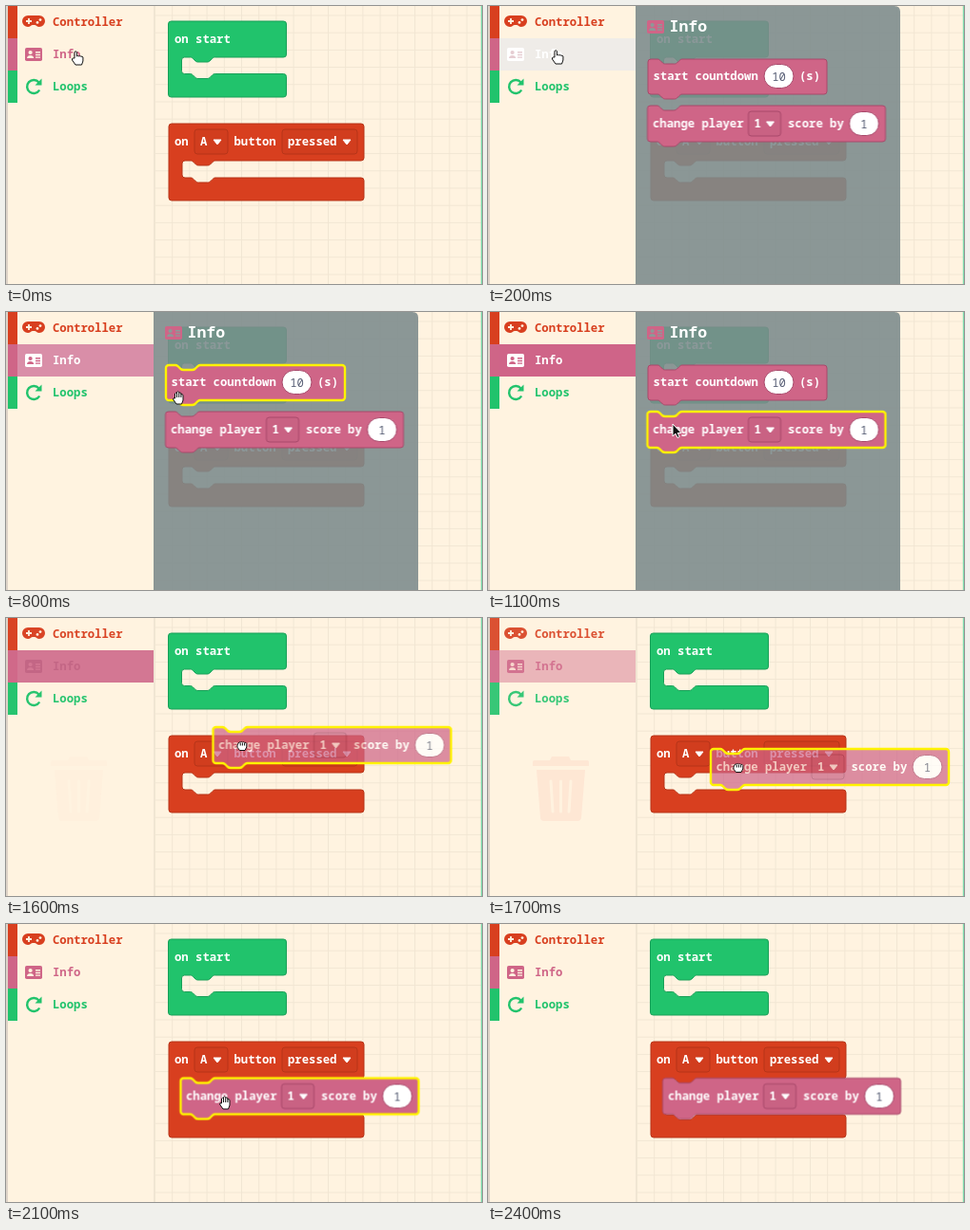
These frames come from a looping animation (500x293 px, 4400 ms). An HTML page:

```html
<!DOCTYPE html>
<html lang="en">
<head>
<meta charset="utf-8">
<title>Dragging a score block</title>
<style>
  html, body { margin: 0; width: 100%; height: 100%; overflow: hidden; background: #fff3e0; }
  svg { display: block; width: 100vw; height: 100vh; }
  text { font: 600 12.25px "Noto Sans Mono", "DejaVu Sans Mono", monospace; white-space: pre; }
  .title { font-size: 16.5px; }
  .label { fill: #fff; }
  .value { fill: #575e75; text-anchor: middle; font-weight: 500; }
  .green { fill: #21c36c; stroke: #18a058; }
  .red { fill: #d83f1f; stroke: #b63519; }
  .pink { fill: #cf6587; stroke: #a8486a; }
  .glow { fill: none; stroke: #fff200; stroke-width: 2.4; stroke-linejoin: round; }
  .hand { fill: #fff; stroke: #111; stroke-width: 1; stroke-linejoin: round; }
</style>
</head>
<body>
<svg id="stage" viewBox="0 0 500 293" preserveAspectRatio="none"></svg>
<script>
const LOOP = 4400;

// Connector bump, 26 wide and 5 deep, drawn rightwards (1) or leftwards (-1).
const notch = d =>
  `c${1.5 * d} 0 ${2 * d} .7 ${3 * d} 1.5l${2.5 * d} 2.5c${.8 * d} .7 ${1.5 * d} 1 ${3 * d} 1` +
  `h${9 * d}c${1.5 * d} 0 ${2.2 * d} -.3 ${3 * d} -1l${2.5 * d} -2.5c${d} -.8 ${1.5 * d} -1.5 ${3 * d} -1.5`;

const stackPath = (w, h) =>
  `M0 3a3 3 0 0 1 3 -3h7${notch(1)}H${w - 3}a3 3 0 0 1 3 3V${h - 3}a3 3 0 0 1 -3 3` +
  `H36${notch(-1)}H3a3 3 0 0 1 -3 -3z`;

// Hat block with a mouth of the given height below its header.
const mouthPath = (w, head, mouth, foot) => {
  const low = head + mouth;
  return `M0 3a3 3 0 0 1 3 -3H${w - 3}a3 3 0 0 1 3 3V${head - 3}a3 3 0 0 1 -3 3` +
    `H49${notch(-1)}H17a3 3 0 0 0 -3 3V${low - 3}a3 3 0 0 0 3 3H23${notch(1)}` +
    `H${w - 3}a3 3 0 0 1 3 3V${low + foot - 3}a3 3 0 0 1 -3 3H3a3 3 0 0 1 -3 -3z`;
};

const at = (x, y, body, attrs = '') => `<g transform="translate(${x} ${y})" ${attrs}>${body}</g>`;
const path = (d, attrs) => `<path d="${d}" ${attrs}/>`;
const rect = (x, y, w, h, attrs) => `<rect x="${x}" y="${y}" width="${w}" height="${h}" ${attrs}/>`;
const label = (x, y, s, attrs = 'class="label"') => `<text x="${x}" y="${y}" ${attrs}>${s}</text>`;
const dropdown = (x, y, w, s, edge) =>
  rect(x, y, w, 26, `rx="3" fill="#000" fill-opacity=".03" stroke="${edge}"`) +
  label(x + 6, y + 17, s) +
  path(`M${x + w - 15} ${y + 11}h8l-4 5z`, 'fill="#fff" stroke="#fff" stroke-linejoin="round"');
const oval = (cx, cy, s) =>
  rect(cx - 15.5, cy - 12.5, 31, 25, 'rx="12.5" fill="#fff" stroke="#a8486a"') +
  label(cx, cy + 4.5, s, 'class="value"');

const card = ink => rect(0, 0, 18, 14, 'rx="1.8" fill="currentColor"') +
  `<g fill="${ink}"><circle cx="5.6" cy="5" r="2.1"/><path d="M2 11c0-4 7.2-4 7.2 0z"/>` +
  '<path d="M11 4h5v1.4h-5zM11 6.8h5v1.4h-5zM11 9.6h5v1.2h-5z"/></g>';

const gamepad = path('M5 0H17a6 6 0 0 1 0 12c-2.500 0-3.500-2-5-2h-2c-1.500 0-2.500 2-5 2a6 6 0 0 1 0-12z', 'fill="#d83f1f"') +
  path('M3 6h6M6 3v6', 'stroke="#fff3e0" stroke-width="1.8"') +
  '<g fill="#fff3e0"><circle cx="15" cy="7.400" r="1.400"/><circle cx="18" cy="4.600" r="1.400"/></g>';

const redo = path('M5.500 -4.500A7 7 0 1 0 6.200 3.500', 'fill="none" stroke="#21c36c" stroke-width="2.4"') +
  path('M8.500 -8.500v7h-7z', 'fill="#21c36c"');

const trash = '<g fill="#fddccb">' +
  path('M20 0h18l2 4h17q2 0 2 2v4H0V6q0-2 2-2h16z') +
  path('M4 14h51l-4 50q-.300 4-4 4H12q-3.700 0-4-4z') + '</g>' +
  path('M19 26l2 32M29.500 26v32M40 26l-2 32', 'stroke="#fff0df" stroke-width="3" stroke-linecap="round"');

const cursors = {
  point: path('M-3 1V-5.500q1.200-1.500 2.400 0V-1q1.200-1.200 2.300 0q1.200-1 2.200.300q1.300-.700 2 .700V4L4.500 8H-2L-5.500 3q-.500-2 1-2z', 'class="hand"'),
  open: path('M-3.500 1V-4q1-1.500 2 0V-5.500q1.100-1.300 2.200 0V-4.500q1.100-1.200 2.200 0V-3q1.200-1 2.100.500V3L3.500 7H-2L-5.500 2q0-2 2-1zM-1.500-4V0M.7-4.500V0M2.900-3.500V0', 'class="hand"'),
  fist: path('M-4-2q1-2 2.200-.800q1-1.500 2.200 0q1.200-1.200 2.200.200q1.500-.600 2.200 1V2L3 5.500H-2.500L-5 2.200V0zM-1.800-2V.5M.4-2V.5M2.600-2V.5', 'class="hand"'),
  arrow: path('M-2-7V6L1 3.200L3 7.500L5.200 6.500L3.200 2.500H7z', 'fill="#111" stroke="#fff"')
};

const toolbox =
  rect(2, 34, 153, 34, 'id="row" fill="transparent"') +
  rect(2, 0, 10, 34, 'fill="#d83f1f"') + rect(2, 34, 10, 34, 'fill="#cf6587"') + rect(2, 68, 10, 34, 'fill="#21c36c"') +
  at(18, 10, gamepad) + label(49, 21, 'Controller', 'fill="#d83f1f"') +
  `<g id="info">${at(20, 44, card('var(--ink)'))}${label(49, 55, 'Info', 'fill="currentColor"')}</g>` +
  at(29, 85, redo) + label(49, 89, 'Loops', 'fill="#21c36c"');

const startBlock = at(170.5, 16, path(mouthPath(124, 38, 17.5, 24.500), 'class="green"') + label(6.500, 23, 'on start'));

const eventBlock = at(171, 124,
  path(mouthPath(205, 39, 18, 24), 'class="red" id="short"') +
  path(mouthPath(205, 39, 38, 24), 'class="red" id="tall"') +
  label(6, 23, 'on') + dropdown(27, 6, 35, 'A', '#b63519') +
  label(68.500, 23, 'button') + dropdown(119, 6, 79, 'pressed', '#b63519'));

const countdown = at(168, 56,
  path(stackPath(188, 37), 'class="pink"') + label(5.500, 22, 'start countdown') +
  oval(137.5, 18, '10') + label(159, 22, '(s)') +
  path(stackPath(188, 37), 'class="glow" id="glowTop"'));

const flyout = `<g id="flyout">` +
  path('M155 0H427q6 0 6 6V293H155z', 'fill="#7d8c8d" fill-opacity=".89"') +
  at(167, 15, card('#8d9998'), 'color="#cf6587"') + label(190.5, 27, 'Info', 'class="label title"') +
  countdown + '</g>';

const scoreBlock = `<g id="block"><g id="body">` +
  path(stackPath(250, 38), 'class="pink"') + label(5.500, 23, 'change player') +
  dropdown(106, 6, 34, '1', '#a8486a') + label(147.5, 23, 'score by') + oval(227.5, 19, '1') +
  '</g>' + path(stackPath(250, 38), 'class="glow" id="glow"') + '</g>';

const marker = `<g id="marker">` + at(184, 163, path(stackPath(250, 38), 'fill="#d3cabc"') +
  path(`M3 -1h7${notch(1)}h5`, 'class="glow"')) + '</g>';

document.getElementById('stage').innerHTML =
  `<defs><pattern id="grid" x="156" y="9.500" width="18.200" height="18.200" patternUnits="userSpaceOnUse">
    <path d="M0 .5H18.200M.5 0V18.200" stroke="#f1e6d3"/></pattern></defs>` +
  rect(0, 0, 500, 293, 'fill="#fff3e0"') + rect(155, 0, 345, 293, 'fill="url(#grid)"') +
  rect(155, 0, 1, 293, 'fill="#f0e5d3"') +
  rect(0, 0, 2, 293, 'fill="#ddd3c8"') + rect(498.8, 0, 1.200, 293, 'fill="#7fdcb0"') +
  `<g id="trash">${at(47, 146, trash)}</g><g id="toolbox">${toolbox}</g>` +
  startBlock + eventBlock + marker + flyout + scoreBlock +
  '<g id="cursor">' + Object.entries(cursors).map(([id, art]) => `<g id="${id}">${art}</g>`).join('') + '</g>';

// Emits stepped keyframes for one property from { milliseconds: value }.
const rules = [], running = {};
function track(id, prop, steps) {
  const name = `${id}-${prop.replace(/^-+/, '')}`;
  const frames = Object.entries(steps).map(([ms, value]) =>
    `${Math.floor(ms / LOOP * 1e5) / 1e3}%{${prop}:${value}}`);
  frames.push(`100%{${prop}:${Object.values(steps).pop()}}`);
  rules.push(`@keyframes ${name}{${frames.join('')}}`);
  (running[id] ||= []).push(`${name} ${LOOP}ms step-end infinite`);
}
const show = (id, from, to) => track(id, 'opacity', from ? { 0: 0, [from]: 1, [to]: 0 } : { 0: 1, [to]: 0 });
const move = (id, stops) => track(id, 'transform',
  Object.fromEntries(Object.entries(stops).map(([ms, [x, y]]) => [ms, `translate(${x}px,${y}px)`])));

track('row', 'fill', {
  0: 'transparent', 100: '#f2ece3', 200: '#efece8', 300: '#e6bfca', 800: '#d98ea8', 900: '#d57d9b',
  1000: '#d27092', 1100: '#cf6488', 1600: '#d27391', 1700: '#e8aeb5', 1800: '#f8d3ca',
  1900: '#fbe4d6', 2000: '#fdecdb', 2100: 'transparent'
});
track('info', 'color', { 0: '#cf6587', 200: '#fff', 1600: '#c26283', 1700: '#cf6587' });
track('info', '--ink', { 0: '#fff3e0', 200: '#e6cdd2', 800: '#cf6587', 1600: '#d27391', 1700: '#f8d3ca', 2100: '#fff3e0' });
track('toolbox', 'opacity', { 0: 1, 1600: .97, 1700: .9, 1800: .82, 1900: .8, 2000: .92, 2100: 1 });
track('trash', 'opacity', { 0: 0, 1600: .12, 1700: .55, 1800: 1, 2000: .4, 2100: 0 });

show('flyout', 200, 1600);
show('glowTop', 800, 1000);
show('glow', 1000, 2400);
show('short', 0, 1800);
track('tall', 'opacity', { 0: 0, 1800: 1 });
show('marker', 1800, 2000);
track('block', 'opacity', { 0: 0, 200: 1 });
track('body', 'opacity', { 0: 1, 1600: .72, 2000: 1 });
move('block', {
  0: [167.5, 105], 1600: [217.5, 115], 1700: [234, 138], 1800: [202.5, 161], 1900: [205, 167], 2000: [183.5, 162.500]
});

move('cursor', {
  0: [75, 54], 100: [73, 53], 800: [181, 90], 900: [184, 99], 1000: [190, 112], 1100: [196, 125],
  1600: [248, 134], 1700: [263, 157], 1800: [227, 180], 1900: [229, 186], 2000: [230, 188], 2200: [246, 280]
});
show('point', 0, 800);
show('open', 800, 1100);
show('arrow', 1100, 1600);
show('fist', 1600, 2000);
track('open', 'opacity', { 0: 0, 800: 1, 1100: 0, 2000: 1, 2400: 0 });

for (const [id, list] of Object.entries(running)) rules.push(`#${id}{animation:${[...new Set(list)].join()}}`);
document.head.appendChild(document.createElement('style')).textContent = rules.join('\n');
</script>
</body>
</html>
```
